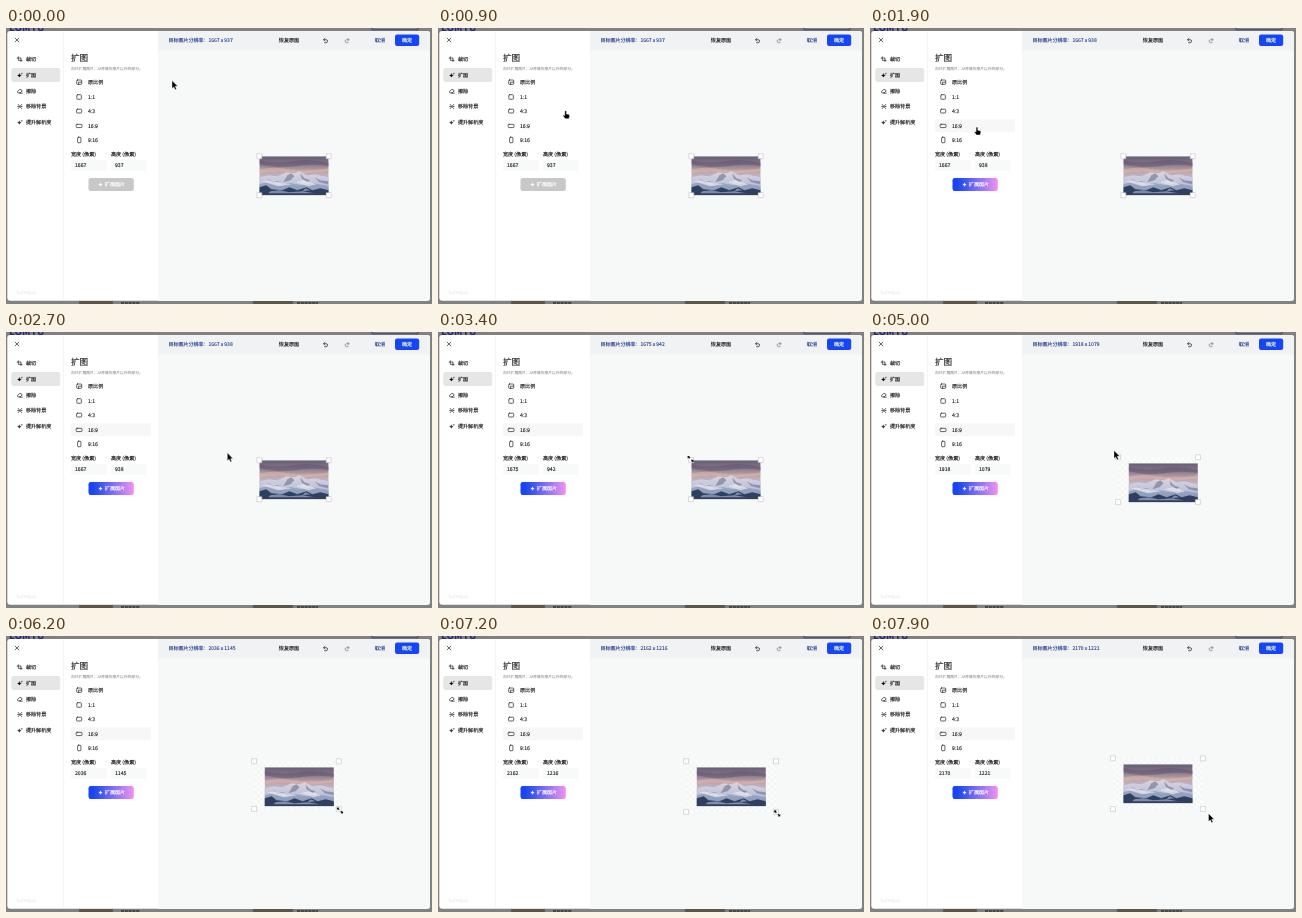
Animation of 426x276 px, one loop 8000 ms. Source, as an HTML page:

```html
<!DOCTYPE html>
<html lang="zh-CN">
<head>
<meta charset="utf-8">
<style>
html, body { margin: 0; width: 100%; height: 100%; overflow: hidden; background: #818181; }
svg { display: block; width: 100vw; height: 100vh; }
text { font: 5.1px "Noto Sans CJK SC", "Noto Sans CJK", sans-serif; fill: #333; text-rendering: geometricPrecision; }
.b { fill: #1c1c1c; stroke: #1c1c1c; stroke-width: .14; }
.blue { fill: #1c368f; stroke: #1c368f; stroke-width: .1; }
.white { fill: #fff; stroke: #fff; stroke-width: .14; }
.icon { fill: none; stroke: #222; stroke-width: .7; stroke-linecap: round; stroke-linejoin: round; }
</style>
</head>
<body>
<svg viewBox="0 0 426 276">
  <defs>
    <linearGradient id="glow"><stop offset=".1" stop-color="#1845f3"/><stop offset=".5" stop-color="#7569f5"/><stop offset="1" stop-color="#f391f5"/></linearGradient>
    <linearGradient id="sky" x2="0" y2="1"><stop stop-color="#675d74"/><stop offset=".2" stop-color="#84758a"/><stop offset=".38" stop-color="#c0a3a6"/><stop offset=".5" stop-color="#bdb0c0"/></linearGradient>
    <linearGradient id="snow" x2="0" y2="1"><stop stop-color="#dcd3dc"/><stop offset=".5" stop-color="#bfc5da"/><stop offset="1" stop-color="#7888aa"/></linearGradient>
    <pattern id="check" width="6" height="6" patternUnits="userSpaceOnUse"><path d="M0 0h6v6H0z" fill="#fcfcfc"/><path d="M0 0h3v3H0zM3 3h3v3H3z" fill="#f4f5f5"/></pattern>
    <clipPath id="crop"><path d="M0 0h69.3v39H0z"/></clipPath>
    <path id="star" d="M0-2.2Q.4-.4 2.2 0Q.4.4 0 2.2Q-.4.4-2.2 0Q-.4-.4 0-2.2"/>
  </defs>

  <!-- dimmed page behind the dialog -->
  <text x="3" y="2.7" style="font-size:10px;font-weight:800;fill:#17276f">LOMTU</text>
  <path d="M366 0v1.8h46V0" fill="none" stroke="#2a3a72" stroke-width=".8"/>
  <path d="M73 273h34v3H73zM247 273h40v3h-40z" fill="#5c564a"/>
  <path d="M115 275h19M291 275h21" stroke="#333" stroke-width="1.4" stroke-dasharray="3 .8"/>

  <!-- dialog -->
  <rect x="1.3" y="3" width="422.5" height="269.8" rx="3" fill="#fff"/>
  <path d="M152 3h269a3 3 0 0 1 3 3v264a3 3 0 0 1-3 3H152z" fill="#f7f9f9"/>
  <path d="M152 3h269a3 3 0 0 1 3 3v16.5H152z" fill="#f0f2f3"/>
  <path d="M57.5 3v269.8" stroke="#f2f2f2" stroke-width=".8"/>
  <path d="M9.2 10.2l3.6 3.6m0-3.6l-3.6 3.6" class="icon" style="stroke:#1c2546"/>
  <rect x="5.3" y="40" width="48.9" height="14" rx="2" fill="#e6e6e6"/>
  <g class="icon">
    <path d="M12.3 28.8v3.6h3.8M11.2 30h3.8v3.6"/>
    <path d="M11.4 63.7l2.6-2.6 2.2 1.6-1.8 2.2h-2zM13.7 65.2h2.6"/>
    <path d="M12.2 76.4l3.4 4.2m0-4.2l-3.4 4.2M11.6 78.5h1M15.2 78.5h1"/>
  </g>
  <use href="#star" x="13.4" y="47.4" fill="#111"/>
  <use href="#star" x="13.3" y="94.6" fill="#333"/>
  <path d="M15.7 45v1.2M15.1 45.6h1.2M15.7 92.2v1.2M15.1 92.8h1.2" class="icon" style="stroke-width:.4"/>
  <g id="labels"></g>
  <rect id="row" x="65" y="91.2" width="80" height="13" rx="1.5" fill="#f7f7f7"/>
  <g class="icon">
    <rect x="70.7" y="52" width="5" height="4.4" rx=".8"/><path d="M72.5 56v-1.8h3"/>
    <rect x="70.8" y="66.7" width="4.6" height="4.6" rx=".9"/>
    <rect x="70.5" y="81.2" width="5.2" height="3.8" rx=".9"/>
    <rect x="70.2" y="96.3" width="5.8" height="3.3" rx=".9"/>
    <rect x="71.6" y="109.2" width="3.3" height="5.6" rx=".9"/>
  </g>
  <g id="ratios"></g>
  <rect x="65" y="132" width="36" height="11" rx="1.5" fill="#f8f9f9"/>
  <rect x="105" y="132" width="35.5" height="11" rx="1.5" fill="#f8f9f9"/>
  <text id="wide" x="69" y="139.2" class="b"></text>
  <text id="high" x="109" y="139.2" class="b"></text>
  <rect id="go" x="82.5" y="150" width="45.3" height="13" rx="2.2"/>
  <use href="#star" x="94.5" y="156.6" fill="#fff"/>
  <text x="98.8" y="158.4" class="white">扩展图片</text>
  <text x="10.5" y="265.6" style="fill:#dfdfdf">Lumqua</text>

  <!-- top bar -->
  <text id="size" x="162.5" y="14.2" class="blue" style="font-size:5px"></text>
  <text x="272.8" y="14.2" class="b">恢复原图</text>
  <path d="M319 10.4l-1.4 1.3 1.4 1.3M317.7 11.7h2.4a1.5 1.5 0 0 1 0 3h-1.4" class="icon"/>
  <path d="M341.7 10.4l1.4 1.3-1.4 1.3M343 11.7h-2.4a1.5 1.5 0 0 0 0 3h1.4" class="icon" style="stroke:#777"/>
  <text x="368.8" y="14.2" class="blue">取消</text>
  <rect x="389" y="6.5" width="24.2" height="11.5" rx="2.2" fill="#1546f0"/>
  <text x="395.9" y="14.2" class="white">确定</text>

  <!-- workspace -->
  <rect id="frame" fill="url(#check)"/>
  <g id="photo" clip-path="url(#crop)">
    <path d="M0 0h69.3v39H0z" fill="url(#sky)"/>
    <path d="M0 4q18 4 34 1t36 2v3q-18-3-34 0T0 8z" fill="#57506a" opacity=".45"/>
    <path d="M0 13q15-3 30 0t40-1v3q-20 3-38 1T0 17z" fill="#dcb9b0" opacity=".55"/>
    <path d="M0 21l9-2 9 1 9-4 8 1 5-2 8 4 8-1 13.3 3v18H0z" fill="url(#snow)"/>
    <path d="M28 19l4-2 3 3-4 4-7 2zM41 17l4 5 6 2-3 2-6-4zM55 21l6 3 8 1v3l-9-2zM8 23l7 2 6 0-8 2z" fill="#75809f" opacity=".7"/>
    <path d="M0 28l8-2 10 3 14-2 10 2 12-2 15.3 3v9H0z" fill="#8d9bbb" opacity=".75"/>
    <path d="M2 25l10-1 9 3 12 1-14 2zM36 26l8-2 13 4-8 2z" fill="#ece9f0" opacity=".7"/>
    <path d="M0 31l7-2 5 4 11 1 7-3 8 3 9-3 6 3 8-2 8.3 2v5H0z" fill="#2f3f60"/>
    <path d="M11 35l9-1 10 2 13-1 12 2H9zM46 32l5 2-8 1z" fill="#a3b0cb" opacity=".7"/>
  </g>
  <path id="handles" fill="#fff" stroke="#b4b6ba" stroke-width=".5"/>

  <path id="arrow" d="M0 0v8l1.8-1.6 1.3 2.8 1.4-.7-1.3-2.7h2.5z" stroke="#fff" stroke-width=".4"/>
  <path id="hand" d="M-.9.6Q0-.7.8.6V3.2l2.4.6q.9.3.7 1.3L3.2 8H-.6L-2.7 4.9q.4-1 1.8 0z" stroke="#fff" stroke-width=".4"/>
  <path id="resize" d="M-3.1-3.1h2.5l-.7.8 1 1-1 1-1-1-.8.8zM3.1 3.1H.6l.7-.8-1-1 1-1 1 1 .8-.8z" stroke="#fff" stroke-width=".2"/>
</svg>
<script>
const LOOP = 8000, SELECT = 1500, DROP1 = 4650, DROP2 = 7500;
const SCALE = .04157, CX = 288, CY = 147.7;
const $ = id => document.getElementById(id);
const set = (id, attrs) => Object.entries(attrs).forEach(([k, v]) => $(id).setAttribute(k, v));
const text = (x, y, s, more = 'class="b"') => `<text x="${x}" y="${y}" ${more}>${s}</text>`;

$('labels').innerHTML =
  ['裁切', '扩图', '擦除', '移除背景', '提升解析度'].map((s, i) => text(19.9, 32.9 + 15.8 * i, s)).join('') +
  text(65, 33.3, '扩图', 'class="b" style="font-size:8.6px"') +
  text(65, 42, '向外扩展图片，AI将填充图片以外的部分。', 'style="font-size:3.8px;fill:#777"') +
  text(65, 128.4, '宽度 (像素)') + text(105, 128.4, '高度 (像素)');
$('ratios').innerHTML =
  ['原比例', '1:1', '4:3', '16:9', '9:16'].map((s, i) => text(82, 56 + 14.5 * i, s)).join('');

// Keys are [time, ...values]
function tween(keys, t, ease = u => u) {
  const i = keys.findIndex(k => k[0] > t);
  if (i < 0) return keys.at(-1).slice(1);
  const a = keys[i - 1], b = keys[i], u = ease((t - a[0]) / (b[0] - a[0]));
  return a.slice(1).map((v, j) => v + (b[j + 1] - v) * u);
}
const smooth = u => u * u * (3 - 2 * u);

const widths = [[0, 1667], [3200, 1667], [3400, 1675], [4500, 1918], [5700, 1918], [6200, 2036], [7200, 2162], [7400, 2170]];
const moves = [[0, 166, 52.5], [300, 166, 52.5], [1300, 107, 99], [2000, 107, 99], [3000, 252.6, 126.8], [3200, 252.6, 126.8],
  [DROP1, 243, 121.5], [5000, 244, 118.5], [5600, 328.4, 171.6], [DROP2, 338.5, 178], [7800, 338.5, 177.5]];
const span = w => [w * SCALE, w * SCALE * .5625];
const [w0, h0] = span(1667), [w1, h1] = span(1918);

function place(t, w, h) {
  if (t < DROP1) return [CX + w0 / 2 - w, CY + h0 / 2 - h];
  return t < DROP2 ? [CX - w1 / 2, CY - h1 / 2] : [CX - w / 2, CY - h / 2];
}

function draw(t) {
  const width = tween(widths, t)[0], ready = t >= SELECT;
  const wide = Math.round(width), high = ready ? Math.round(width * .5625) : 937;
  const [w, h] = span(width), [x, y] = place(t, w, h);
  const first = t < DROP1;
  const px = first ? CX - w0 / 2 : x + w1 - w0, py = first ? CY - h0 / 2 : y + h1 - h0;

  $('wide').textContent = wide;
  $('high').textContent = high;
  $('size').textContent = `目标图片分辨率：${wide} x ${high}`;
  set('row', { opacity: +ready });
  set('go', { fill: ready ? 'url(#glow)' : '#c8c8c8' });
  set('frame', { x, y, width: w, height: h });
  set('check', { x, y });
  set('photo', { transform: `translate(${px} ${py})` });
  set('handles', { d: [[x, y], [x + w, y], [x, y + h], [x + w, y + h]]
    .map(([a, b]) => `M${a - 2.5} ${b - 2.5}h5v5h-5z`).join('') });

  let [cx, cy] = tween(moves, t, smooth);
  const drag1 = t >= 3000 && t < DROP1, drag2 = t >= 5600 && t < DROP2;
  if (drag1) [cx, cy] = [x - .4, y - 1];
  if (drag2) [cx, cy] = [x + w + 1.2, y + h + 1.6];
  const kind = drag1 || drag2 ? 'resize' : cx < 146 && cy > 60 && cy < 120 ? 'hand' : 'arrow';
  for (const id of ['arrow', 'hand', 'resize'])
    set(id, { opacity: +(id === kind), transform: `translate(${cx} ${cy})` });
}

const start = performance.now();
(function tick() {
  draw((performance.now() - start) % LOOP);
  requestAnimationFrame(tick);
})();
</script>
</body>
</html>
```
